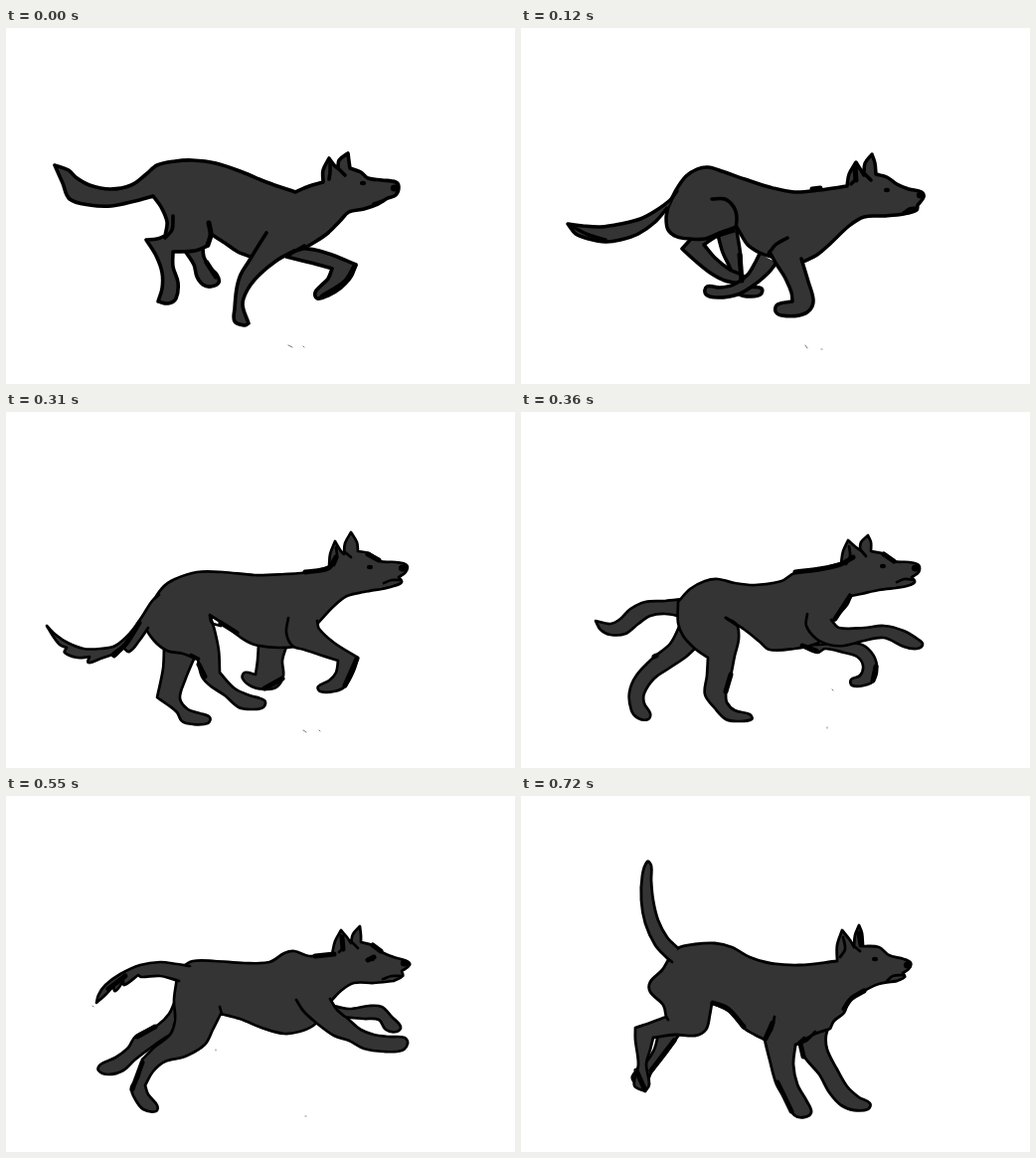
These frames come from a looping animation (512x358 px, 840 ms). An HTML page:

```html
<!DOCTYPE html>
<html lang="en">
<head>
<meta charset="utf-8">
<title>Running dog</title>
<style>
html, body { margin: 0; width: 100%; height: 100%; overflow: hidden; background: #fff; }
svg { display: block; width: 100%; height: 100%; }
.skin { fill: #333433; stroke: #000; }
.ink { fill: none; stroke: #000; }
.bold { fill: none; stroke: #000; stroke-width: 5; }
.speck { fill: none; stroke: #777; stroke-width: 1; }
path { stroke-linecap: round; stroke-linejoin: round; }
</style>
</head>
<body>
<svg id="stage" viewBox="0 0 512 358"></svg>
<script>
const STEP = 120;
const NS = "http://www.w3.org/2000/svg";
const stage = document.getElementById("stage");

// Outlines are smooth curves through points; "|" marks a sharp corner.
const poses = [
  {
    w: 3.6, eye: [359, 156], nose: [391, 161],
    far: [
      "180,224 189,238 192,250 198,258 206,260 214,256 212,248 204,240 199,230 198,222",
      "296,221 315,224 333,230 352,238 | 347,250 337,261 324,269 313,272 311,266 317,259 324,252 328,242 | 314,238 298,234 282,230"
    ],
    body: "49,138 63,143 70,150 84,158 105,162 126,158 141,147 152,138 170,134 187,133 211,136 238,145 262,155 291,165 | 305,159 319,155 | 319,143 325,131 | 331,139 334,141 | 335,133 344,126 | 345,134 346,141 | 357,145 364,151 378,153 392,155 395,160 392,168 384,171 | 374,177 360,182 345,185 336,194 324,206 311,215 298,222 284,226 | 265,236 246,230 233,225 220,216 206,207 | 203,219 | 190,224 168,225 | 168,240 173,256 171,272 163,277 153,275 | 157,262 157,246 151,229 141,213 | 152,212 160,209 | 162,195 156,180 148,169 | 130,174 106,179 84,178 64,172 57,156 49,138",
    near: ["290,224 272,234 254,249 243,263 238,278 244,297 | 240,299 230,295 230,282 232,262 236,248 244,235 255,217 262,206"],
    ink: ["326,135 326,145 325,152", "334,141 341,148", "370,177 379,174", "160,211 167,203 168,189", "300,219 283,229"],
    bold: ["204,196 206,208 203,218", "202,236 211,250", "351,239 341,255 318,270"],
    specks: ["284,319 288,321", "299,320 300,321"]
  },
  {
    w: 3.5, eye: [368, 163], nose: [402, 168],
    far: [
      "198,208 203,226 211,243 214,258 | 220,268 232,270 241,268 242,262 230,260 222,256 221,230 217,204",
      "172,211 162,222 | 175,234 190,246 205,254 222,257 | 224,250 210,243 195,231 184,218 | 196,210 214,204",
      "240,227 236,235 228,248 214,258 200,261 187,260 186,268 198,271 218,268 235,258 249,246 257,236"
    ],
    body: "148,180 156,163 166,149 177,142 188,140 202,144 225,152 250,160 275,165 300,163 328,159 | 330,147 337,135 | 342,143 345,148 | 346,136 353,127 | 356,136 357,147 | 368,150 378,157 390,162 403,165 405,170 399,178 | 398,183 385,187 365,189 345,190 330,199 312,216 298,228 284,235 | 270,232 252,230 240,226 228,218 221,207 217,200 | 200,206 185,212 170,212 157,210 148,203 146,191 148,180",
    near: [
      "157,164 150,173 135,184 120,192 100,197 80,200 62,199 47,197 | 55,207 68,212 85,215 100,213 118,207 135,195 147,181",
      "250,225 256,236 265,250 272,266 273,275 | 258,278 256,285 262,289 280,289 291,283 294,273 289,255 282,232"
    ],
    ink: ["192,172 205,172 214,180 217,190 216,202", "268,211 256,218 249,227", "337,140 336,152 332,157", "346,147 352,153", "385,186 391,182 398,181", "52,200 68,208 85,213"],
    bold: ["293,162 301,161", "336,141 337,153", "220,228 222,254"],
    specks: ["286,319 288,322", "302,323 303,323"]
  },
  {
    w: 2.7, eye: [366, 156], nose: [399, 157],
    far: [
      "159,236 158,258 152,287 | 162,294 172,302 177,311 188,314 203,313 205,307 195,303 183,299 175,288 180,270 190,246",
      "254,234 253,250 251,264 | 240,262 238,268 247,276 262,279 273,276 279,265 278,250 282,236"
    ],
    body: "146,193 158,176 170,168 192,161 218,161 250,164 280,163 305,161 325,156 | 326,143 331,130 | 337,140 340,143 | 341,132 347,121 | 353,131 354,140 | 365,142 376,150 392,151 403,154 402,161 395,166 | 398,171 390,175 378,178 | 360,181 343,185 330,195 314,212 | 310,225 300,234 275,237 250,234 235,226 220,214 205,204 | 210,220 214,240 215,262 | 230,278 245,285 260,290 259,297 247,299 234,297 220,285 205,275 197,266 193,249 | 178,243 162,240 149,230 140,215 142,202 146,193",
    near: [
      "154,184 147,190 136,207 125,222 110,235 95,238 78,238 62,232 50,224 41,215 | 47,225 54,234 61,237 | 59,242 72,247 84,246 | 83,252 95,248 107,244 | 109,246 118,237 | 124,241 134,230 143,217",
      "313,210 315,218 330,232 354,247 | 350,260 341,276 330,281 316,281 314,276 325,270 332,262 334,250 | 315,244 300,239 288,235 282,222 284,207"
    ],
    ink: ["332,136 333,146 330,154", "341,141 347,146", "380,172 388,169 396,169", "205,205 207,212 216,215", "194,248 186,244"],
    bold: ["108,244 120,234 134,212", "301,161 324,157 332,146", "353,248 341,275", "216,212 232,222", "194,254 200,266", "278,268 260,278", "364,143 375,149"],
    specks: ["299,320 302,322", "315,320 316,321"]
  },
  {
    w: 2.7, eye: [364, 155], nose: [397, 157],
    far: [
      "163,188 145,190 125,191 110,198 100,208 90,213 75,210 | 80,219 90,224 105,223 118,213 130,205 145,203 163,206",
      "160,214 150,233 133,247 116,265 109,282 111,300 118,308 128,309 130,303 124,293 124,283 134,268 150,257 165,247 177,236",
      "280,234 300,234 318,232 340,233 352,241 358,255 355,270 345,275 333,275 332,269 341,265 344,255 338,246 325,242 306,238 298,242 280,234"
    ],
    body: "158,191 170,178 185,170 198,168 215,172 235,174 262,170 275,162 300,158 322,152 | 324,140 329,129 | 337,136 341,139 | 342,131 349,124 | 352,131 352,140 | 366,143 375,150 390,151 400,154 400,161 393,166 | 396,171 388,175 377,177 | 360,179 342,183 332,185 | 328,194 318,205 313,212 | 308,226 297,233 275,238 250,239 240,231 225,219 206,207 | 217,214 219,228 215,245 211,265 206,283 | 207,292 215,300 230,304 232,309 218,311 206,309 195,298 185,284 187,265 188,247 | 175,238 163,225 158,212 158,191",
    near: ["312,209 320,217 345,217 365,215 385,220 400,229 404,234 398,238 385,236 365,227 345,230 325,235 310,234 297,228 287,215 288,203"],
    ink: ["330,135 331,145 327,153", "341,138 347,145", "378,171 386,168 395,169", "206,207 216,214"],
    bold: ["276,161 300,158 322,153 334,146", "331,185 316,208", "283,235 297,240", "357,256 354,270", "211,264 206,281", "365,143 375,150", "134,246 136,245"],
    specks: ["313,279 314,280", "308,317 308,318"]
  },
  {
    w: 2.7, eye: [368, 164], nose: [401, 168],
    far: [
      "170,206 164,219 153,230 130,242 123,253 110,263 95,270 93,276 103,280 118,276 130,265 150,250 168,238",
      "326,210 345,214 365,211 378,212 388,222 397,232 393,237 382,235 375,225 360,224 336,222"
    ],
    body: "172,183 178,172 188,166 210,166 240,168 265,167 280,158 290,156 305,161 328,159 | 331,146 337,135 | 343,142 347,148 | 349,139 356,131 | 357,140 357,147 | 368,150 378,157 390,162 403,166 406,170 398,176 | 399,181 390,186 | 370,188 350,188 338,195 327,206 | 320,220 309,231 295,237 280,239 260,234 235,224 216,219 | 208,235 200,250 180,262 160,267 148,277 140,291 | 143,300 152,311 151,317 138,315 130,305 126,293 133,283 137,265 | 150,252 165,240 170,225 169,205 172,183",
    near: [
      "185,171 172,169 155,167 135,170 115,179 100,190 93,200 91,208 | 100,200 108,191 | 110,196 118,186 | 119,190 133,180 | 136,182 155,181 174,186",
      "326,204 333,215 345,225 357,235 370,240 385,242 401,243 404,249 398,256 380,257 360,254 345,246 330,241 312,228 299,216 292,205"
    ],
    ink: ["217,219 215,212", "337,140 339,152 335,157", "348,147 354,153", "379,184 388,181 399,181"],
    bold: ["338,142 339,154", "311,161 330,159", "127,295 137,268", "132,242 150,232", "103,194 120,181", "369,150 377,156", "364,165 370,162"],
    specks: ["211,255 211,256", "87,211 88,212", "301,322 302,322"]
  },
  {
    w: 2.8, eye: [373, 177], nose: [403, 184],
    far: [
      "190,160 170,146 145,140 125,140 105,145 91,150 | 93,153 115,151 140,149 158,153 172,162 185,171",
      "230,206 212,218 190,226 158,230 | 180,210 205,196",
      "160,206 148,207 143,199 135,201 130,212 115,219 105,224 110,227 125,226 140,221 158,214",
      "322,222 332,234 350,248 370,256 390,257 399,262 396,270 380,271 362,266 345,262 330,252 318,240"
    ],
    body: "176,177 183,165 193,157 208,158 235,163 262,166 280,165 290,161 305,164 333,168 | 336,155 340,149 | 348,155 352,162 | 355,152 361,143 | 363,150 364,158 | 376,163 386,173 398,179 407,183 406,189 399,194 | 400,198 390,201 | 370,202 350,200 335,204 326,215 | 318,228 310,236 297,239 285,241 265,238 245,228 225,211 205,196 | 190,207 175,217 155,230 135,242 112,255 104,265 95,267 84,264 | 85,259 95,255 115,248 140,232 160,213 168,195 176,177",
    near: ["327,211 321,226 318,243 322,256 328,275 340,291 352,304 363,312 360,317 345,312 330,300 315,282 302,265 298,252 298,238 | 310,225"],
    ink: ["289,207 286,215 287,227 296,237", "298,238 304,237", "341,154 343,164 339,170", "353,161 360,167", "383,197 391,194 400,196"],
    bold: ["318,167 334,168 345,162", "352,161 356,154", "326,212 319,238", "365,159 384,171", "183,163 193,158", "322,287 345,311", "164,229 176,226", "144,203 148,210", "86,263 102,265", "388,196 398,195"],
    specks: ["188,249 189,249", "207,250 207,251", "289,326 289,327"]
  },
  {
    w: 2.8, eye: [356, 164], nose: [389, 170],
    far: [
      "138,240 134,255 125,269 112,282 117,290 125,290 131,278 145,260 159,240",
      "312,228 307,240 308,255 318,275 328,292 340,303 351,309 349,315 335,316 322,311 310,298 300,280 285,262 281,248"
    ],
    body: "148,165 158,153 175,149 195,148 212,152 230,162 250,168 280,170 318,166 | 318,150 323,135 | 331,145 335,152 | 336,140 340,130 | 343,138 344,151 | 360,152 370,160 385,164 392,168 390,174 384,178 | 386,182 378,186 | 360,189 345,196 330,206 325,218 315,226 311,234 | 296,239 276,249 258,246 245,245 | 235,240 225,234 210,217 192,208 | 190,220 186,235 175,241 155,240 133,243 | 130,255 126,270 129,290 125,297 | 114,291 118,270 115,245 115,233 | 130,228 146,222 | 143,210 130,197 130,187 142,175 148,165",
    near: [
      "152,167 147,163 135,150 125,128 121,105 122,80 127,66 131,70 131,85 133,105 138,125 147,142 158,153",
      "255,222 252,235 245,245 | 250,265 257,290 268,308 275,321 285,323 292,318 287,306 278,290 274,270 276,251 | 285,243"
    ],
    ink: ["276,250 287,246 296,237", "146,222 148,225", "324,142 326,154 321,162", "335,151 341,156", "368,186 374,181 385,180"],
    bold: ["193,208 208,214 224,232", "154,246 131,276", "116,276 124,294", "253,228 246,244", "258,288 272,317", "340,138 342,150", "325,214 332,204 345,196", "281,249 284,262"],
    specks: []
  }
];

function parse(run) {
  return run.trim().split(/\s+/).map(p => p.split(",").map(Number));
}

function heading(a, b) {
  const dx = b[0] - a[0], dy = b[1] - a[1], len = Math.hypot(dx, dy) || 1;
  return [dx / len, dy / len];
}

function curve(text) {
  let d = "", last = null;
  for (const run of text.split("|")) {
    const pts = parse(run);
    if (last) pts.unshift(last);
    else d = "M" + pts[0];
    const dirs = pts.map((p, i) => heading(pts[i - 1] || p, pts[i + 1] || p));
    for (let i = 1; i < pts.length; i++) {
      const a = pts[i - 1], b = pts[i];
      const reach = Math.hypot(b[0] - a[0], b[1] - a[1]) / 3;
      const shift = (p, dir, s) => p.map((v, k) => (v + dir[k] * s).toFixed(2));
      d += "C" + [shift(a, dirs[i - 1], reach), shift(b, dirs[i], -reach), b].join(" ");
    }
    last = pts[pts.length - 1];
  }
  return d;
}

function add(parent, tag, attrs) {
  const el = document.createElementNS(NS, tag);
  for (const key in attrs) el.setAttribute(key, attrs[key]);
  return parent.appendChild(el);
}

function build(pose) {
  const g = add(stage, "g", { "stroke-width": pose.w, display: "none" });
  const draw = (list, kind) => list.forEach(t => add(g, "path", { class: kind, d: curve(t) }));
  const dot = ([cx, cy], rx, ry) => add(g, "ellipse", { cx, cy, rx, ry });
  draw(pose.far, "skin");
  draw([pose.body], "skin");
  draw(pose.near, "skin");
  draw(pose.ink, "ink");
  draw(pose.bold, "bold");
  draw(pose.specks, "speck");
  dot(pose.eye, 3, 2.2);
  dot(pose.nose, 4.2, 3.6);
  return g;
}

const groups = poses.map(build);
const start = performance.now();
let shown = -1;

function render(ms) {
  const index = Math.floor(ms / STEP) % groups.length;
  if (index === shown) return;
  groups.forEach((g, i) => g.setAttribute("display", i === index ? "inline" : "none"));
  shown = index;
}

function tick() {
  render(Math.max(0, performance.now() - start));
  requestAnimationFrame(tick);
}
tick();
</script>
</body>
</html>
```
